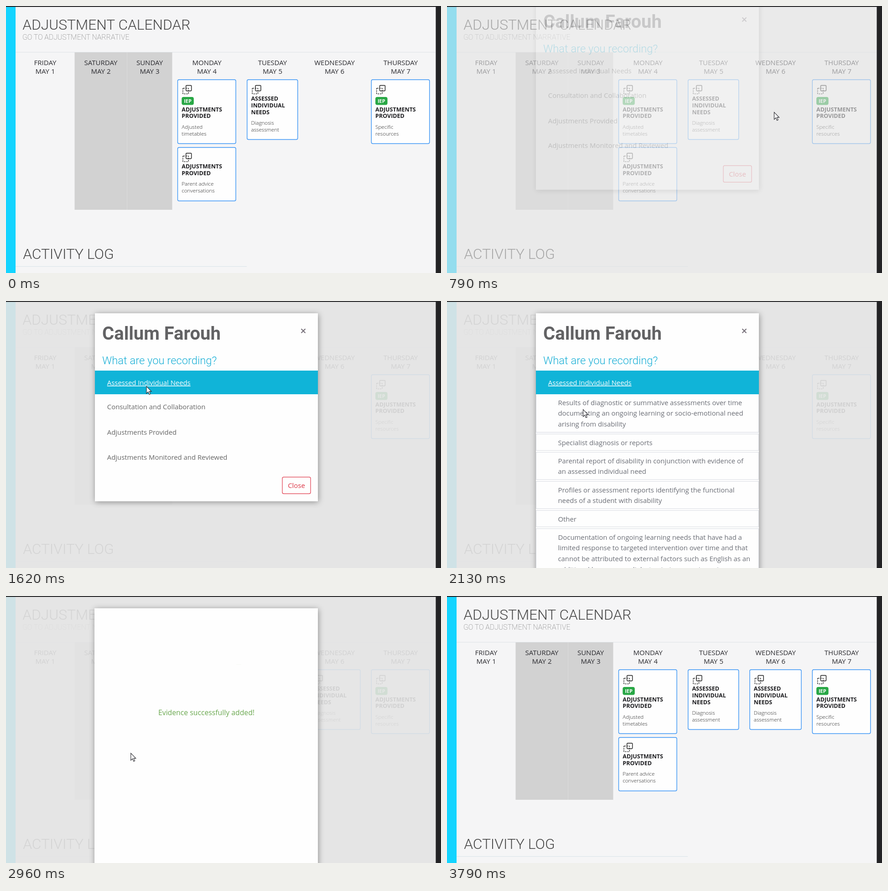
These frames come from a looping animation (954x587 px, 3890 ms). An HTML page:

```html
<!DOCTYPE html>
<html lang="en">
<head>
<meta charset="utf-8">
<title>Adjustment calendar</title>
<style>
  html, body { margin: 0; width: 100%; height: 100%; overflow: hidden; background: #232325; }
  svg { display: block; }
  text { font: 14.87px "Open Sans", "Noto Sans", sans-serif; fill: #666; }
  .h { font: 300 31.7px Roboto, sans-serif; fill: #444; }
  .sub { font: 100 15.8px Roboto, sans-serif; fill: #666; }
  .day { font-size: 15px; font-weight: 500; fill: #2b2b30; }
  .mid { text-anchor: middle; }
  .kind { font-size: 12.5px; font-weight: 700; fill: #1d1d20; }
  .note { font-size: 11.6px; font-weight: 300; fill: #222; }
  .iep { font-size: 11px; font-weight: 700; fill: #fff; }
  .name { font: 700 40px Roboto, sans-serif; fill: #626264; }
  .ask { font: 300 23.75px Roboto, sans-serif; fill: #18afd6; }
  .row { fill: #6b6e76; }
  .small { font-size: 12px; fill: #222; }
  .tiny { font-size: 10.1px; fill: #333; }
  .done { font-size: 15.75px; fill: #6aa84f; }
  .line { fill: none; stroke: #333; stroke-width: 1.6; }
</style>
</head>
<body>
<svg id="stage" width="954" height="587" viewBox="0 0 954 587"></svg>
<script>
const LOOP = 3890, SUB_HEIGHT = 408, PANEL_HEIGHT = 105;

// Markup helpers
const text = (x, y, s, cls = '', extra = '') => `<text x="${x}" y="${y}" class="${cls}" ${extra}>${s}</text>`;
const rect = (x, y, w, h, fill, extra = '') =>
  `<rect x="${x}" y="${y}" width="${w}" height="${h}" fill="${fill}" ${extra}/>`;

function card(x, y, w, h, badge, kind, note) {
  const top = badge ? 69.5 : 46, tx = x + 8.8;
  const lines = (list, from, cls) => list.map((s, i) => text(tx, from + i * 14.9, s, cls)).join('');
  return rect(x, y, w, h, '#fefefe', 'rx="3" stroke="#3a95f5" stroke-width="1.4"') +
    `<g class="line" transform="translate(${x} ${y})">
      <rect x="18.2" y="12.6" width="12" height="12" rx="1.5"/>
      <rect x="11.4" y="18.8" width="12.4" height="12.4" rx="1" stroke-dasharray="3 1.9"/></g>` +
    (badge ? rect(tx, y + 38, 26.5, 17.5, '#28a745', 'rx="4"') + text(tx + 13.2, y + 50.7, 'IEP', 'iep mid') : '') +
    lines(kind, y + top, 'kind') + lines(note, y + top + kind.length * 14.9 + 8.3, 'note');
}

let rowY = 0;
function row(id, lines) {
  const h = 13 + 24 * lines.length, y = rowY;
  rowY += h + 3;
  return rect(.5, y + .5, 488, h - 1, '#fefefe', `stroke="#d9dce2" id="${id}"`) +
    lines.map((s, i) => text(48.5, y + 24.5 + i * 23.8, s, 'row')).join('');
}

const provided = ['ADJUSTMENTS', 'PROVIDED'], assessed = ['ASSESSED', 'INDIVIDUAL', 'NEEDS'];
const diagnosis = ['Diagnosis', 'assessment'];
const days = [['FRIDAY', 86], ['SATURDAY', 208], ['SUNDAY', 315], ['MONDAY', 440.5],
  ['TUESDAY', 584.5], ['WEDNESDAY', 720.5], ['THURSDAY', 865.5]];

const calendar =
  rect(0, 2, 943, 585, '#f5f5f6') + rect(0, 2, 21, 585, '#14d4ff') +
  rect(21, 101, 921, 1.2, '#e1e5e9') + rect(21, 572, 507, 1.2, '#dde5ea') +
  rect(150.5, 102, 214, 346, '#d2d2d2') + rect(265, 102, 1, 346, '#dcdcdc') +
  text(36.3, 51.6, 'ADJUSTMENT CALENDAR', 'h') +
  text(36, 73.6, 'GO TO ADJUSTMENT NARRATIVE', 'sub') +
  text(37.2, 556.2, 'ACTIVITY LOG', 'h') +
  days.map(([d, x], i) => text(x, 130, d, 'day mid') + text(x, 149, 'MAY ' + (i + 1), 'day mid')).join('') +
  card(376.5, 162, 127.5, 140.5, true, provided, ['Adjusted', 'timetables']) +
  card(376.5, 311, 127.5, 117.5, false, provided, ['Parent advice', 'conversations']) +
  card(528.7, 162, 111, 131.5, false, assessed, diagnosis) +
  `<g id="newCard">${card(664, 162, 113, 131.5, false, assessed, diagnosis)}</g>` +
  card(801.3, 162, 127.5, 140.5, true, provided, ['Specific', 'resources']);

const firstRow = row('firstRow', [
  'Results of diagnostic or summative assessments over time',
  'documenting an ongoing learning or socio-emotional need', 'arising from disability']);
const otherRows = [
  ['Specialist diagnosis or reports'],
  ['Parental report of disability in conjunction with evidence of', 'an assessed individual need'],
  ['Profiles or assessment reports identifying the functional', 'needs of a student with disability'],
  ['Other'],
  ['Documentation of ongoing learning needs that have had a',
    'limited response to targeted intervention over time and that',
    'cannot be attributed to external factors such as English as an',
    'additional language or dialect, missing experience in'],
].map((lines, i) => row('row' + i, lines)).join('');

const panel = rect(0, 85, 489, 108, '#f8f9fc') +
  text(165.8, 103.8, 'Optionally attach:', 'tiny') +
  rect(49, 120.5, 58, 48.5, '#f3f3f4', 'rx="2" stroke="#dcdcde"') +
  text(78, 153.8, 'Save', 'small mid', 'style="fill:#c6c6c8"') +
  text(247.8, 165.8, 'Case Note', 'small mid') + text(381, 155.8, 'Evidence', 'small mid') +
  `<g class="line" style="stroke:#18afd6;stroke-width:1.5" transform="translate(239 126)">
    <path d="M14 4V2Q14 .8 12.500 .8H4V4H.8V16Q.8 17.500 2.300 17.500H12.500Q14 17.500 14 16V13M.8 4V14M4 5.500H11M4 9H9M4 13H7"/>
    <path d="M9 13L9.800 10.200 15.500 4.500 17.300 6.300 11.700 12.200Z"/></g>`;

const modal = rect(195, 27, 489, 413, '#fefefe', 'id="sheet" filter="url(#shadow)"') +
  `<g id="form">
    ${text(211, 84.5, 'Callum Farouh', 'name')}
    <path d="M647.500 61.300l9 9m0-9l-9 9" stroke="#756e78" stroke-width="2"/>
    <svg id="list" x="195" y="204" width="489">
      ${panel}${firstRow}<g id="others">${rect(0, 87, 489, 330, '#fefefe')}${otherRows}</g>
    </svg>
    <g id="body">
      ${text(211, 138, 'What are you recording?', 'ask')}
      ${rect(195, 152, 489, 52, '#10b4d8', 'id="active"')}
      ${text(221.8, 184, 'Assessed Individual Needs', '', 'id="choice"')}
    </g>
    <g id="rest">
      ${text(221.8, 238, 'Consultation and Collaboration')}
      ${text(221.8, 293.7, 'Adjustments Provided')}
      ${text(221.8, 348.5, 'Adjustments Monitored and Reviewed')}
      ${rect(606, 387, 62, 36.5, '#fefefe', 'rx="3" stroke="#e0384a" stroke-width="1.2"')}
      ${text(637, 411, 'Close', 'mid', 'style="fill:#dc3545"')}
    </g>
  </g>
  <g id="success">
    ${rect(194, 27, 490, 640, '#fefefe')}
    <g fill="none" stroke="#73af55" stroke-width="11" stroke-dasharray="1000">
      <circle id="ring" cx="440" cy="150" r="70.5" pathLength="390"/>
      <path id="tick" d="M480 122L424.500 177.500 399.500 153" pathLength="100" stroke-linecap="round"/>
    </g>
    ${text(439.5, 262, 'Evidence successfully added!', 'done mid')}
  </g>`;

stage.innerHTML = `<filter id="shadow"><feDropShadow dx="1" dy="2" stdDeviation="6.5" flood-opacity=".38"/></filter>
  ${calendar}${rect(0, 2, 943, 585, '#e4e4e4', 'id="backdrop"')}
  <g id="modal">${modal}</g>
  ${rect(0, 0, 954, 2, '#232325')}${rect(942.5, 0, 12, 587, '#232325')}
  <path id="cursor" d="M.5 .5V16.300L4.200 12.800 6.700 18.500 9.200 17.400 6.800 11.900H11.500Z"
    fill="#fff" stroke="#26262c" stroke-width="1.100"/>`;

// Motion helpers
const el = id => document.getElementById(id);
const ramp = (t, a, b) => Math.min(1, Math.max(0, (t - a) / (b - a)));
const ease = k => k * k * (3 - 2 * k);
const easeOut = k => 1 - (1 - k) ** 2.5;
const set = (id, attrs) => { for (const a in attrs) el(id).setAttribute(a, attrs[a]); };
const show = (id, on) => set(id, { visibility: on ? 'visible' : 'hidden' });

// Pointer stops: time, x, y
const stops = [[60, 826, 516], [480, 717, 233], [820, 717, 233], [1050, 310, 190], [1240, 308, 187.5],
  [1310, 308, 187.5], [1370, 307.5, 187], [1760, 307.5, 187], [2130, 298, 238], [2410, 298, 238],
  [2720, 273, 345], [3430, 274, 345], [3550, 274, 576], [3590, 274, 600]];

function pointer(t) {
  const i = Math.max(1, stops.findIndex(s => s[0] > t));
  const [t0, x0, y0] = stops[i - 1], [t1, x1, y1] = stops[i], k = ease(ramp(t, t0, t1));
  return `translate(${x0 + (x1 - x0) * k} ${y0 + (y1 - y0) * k})`;
}

function draw(t) {
  const open = ramp(t, 780, 870), close = ramp(t, 3590, 3680);
  const list = SUB_HEIGHT * ease(ramp(t, 1620, 1740));
  const extra = PANEL_HEIGHT * ease(ramp(t, 2270, 2365));
  const grown = list + extra, chosen = t >= 1620, picked = t >= 2270, saved = t >= 2960;

  set('backdrop', { opacity: .9 * ramp(t, 750, 810) * (1 - ramp(t, 3630, 3720)) });
  set('modal', {
    opacity: Math.min(1, open * 2) * (1 - close),
    transform: `translate(0 ${-50 * (1 - easeOut(open) + easeOut(close))})`
  });
  set('sheet', { height: 413 + grown, x: saved ? 194 : 195, width: saved ? 490 : 489 });
  set('body', { transform: `translate(0 ${chosen ? 1 : 0})` });
  set('active', { opacity: chosen ? 1 : 0 });
  set('choice', {
    style: chosen ? `fill:#fff;text-decoration:${picked ? 'none' : 'underline'}` : ''
  });
  set('list', { height: Math.max(.01, grown) });
  set('firstRow', { fill: picked ? '#d2d3d5' : '#fefefe', stroke: picked ? '#b4b6ba' : '#d9dce2' });
  set('others', { transform: `translate(0 ${extra})` });
  set('rest', { transform: `translate(0 ${grown})` });

  show('form', !saved);
  show('success', saved);
  show('newCard', saved);
  set('ring', { 'stroke-dashoffset': 1000 * (1 - ease(ramp(t, 2960, 3220))) });
  set('tick', { 'stroke-dashoffset': -100 + 1000 * ease(ramp(t, 3060, 3320)) });

  const active = t >= 60 && t < 3590;
  show('cursor', active);
  if (active) set('cursor', { transform: pointer(t) });
}

const start = performance.now();
(function tick() {
  draw((performance.now() - start) % LOOP);
  requestAnimationFrame(tick);
})();
</script>
</body>
</html>
```
